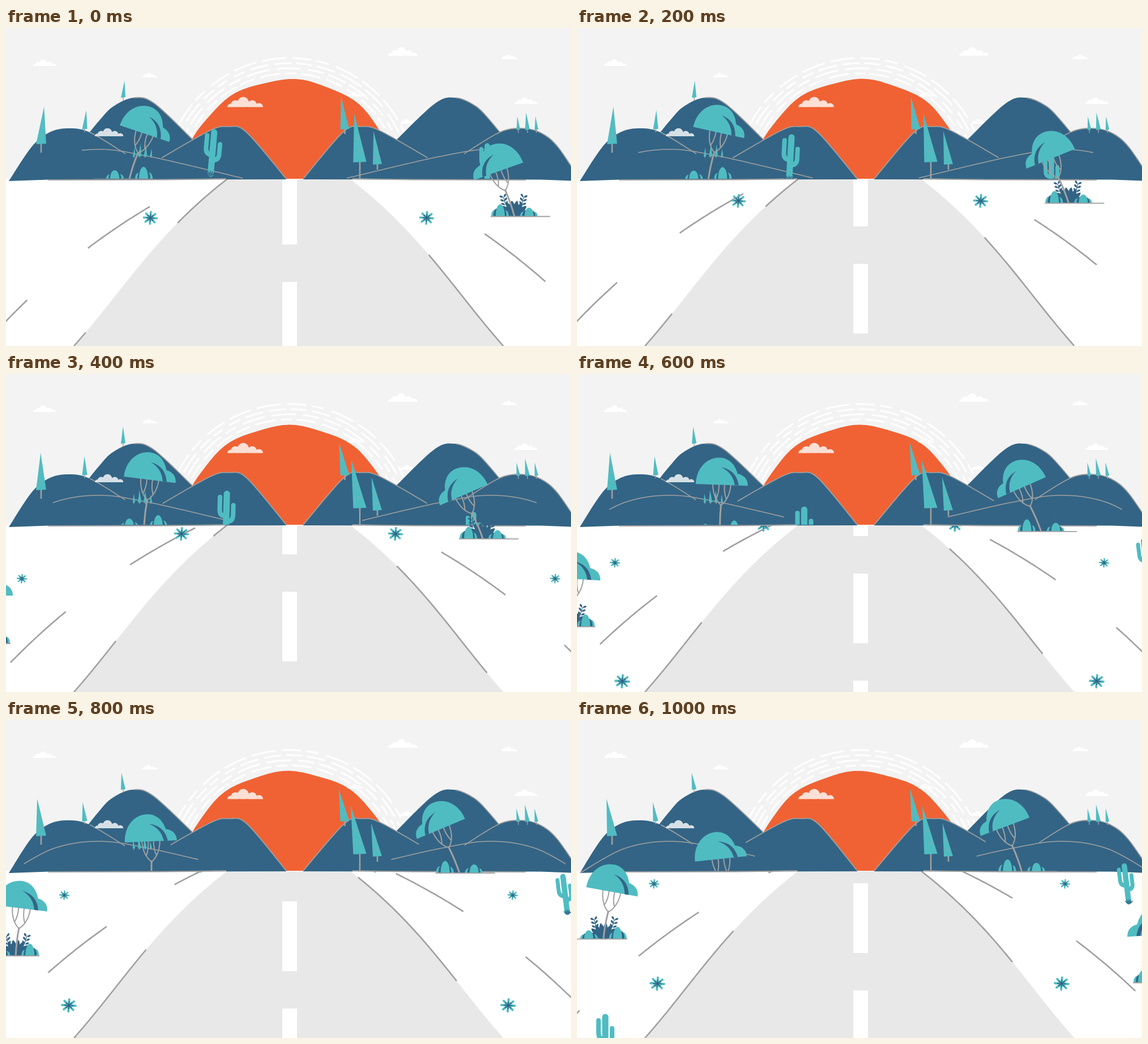
An HTML page with a canvas for the animation above (1.2 s loop, 998 px wide and 561 px high).

```html
<!DOCTYPE html>
<html lang="en">
<head>
<meta charset="utf-8">
<title>Road to the sunset</title>
<style>
html, body { margin: 0; width: 100%; height: 100%; overflow: hidden; background: #fff; }
canvas { display: block; }
</style>
</head>
<body>
<canvas id="stage" width="998" height="561"></canvas>
<script>
const W = 998, H = 561, HORIZON = 267, STEP = 200, STEPS = 6;
const BLUE = '#336485', TEAL = '#4fbcc2', GRAY = '#a0a0a0', SUN = '#f06233';
const g = document.getElementById('stage').getContext('2d');

// ---------- helpers ----------
const rad = d => d * Math.PI / 180;
const quad = (n, a, b, c) => a + b * n + c * n * n;

function random(seed) {
  return () => (seed = (seed * 16807) % 2147483647) / 2147483647;
}

function isolated(draw) { g.save(); draw(); g.restore(); }

function clipped(x, y, w, h, draw) {
  isolated(() => { g.beginPath(); g.rect(x, y, w, h); g.clip(); draw(); });
}

function fill(color, trace) { g.beginPath(); trace(); g.fillStyle = color; g.fill(); }

function stroke(color, width, trace) {
  g.beginPath(); trace();
  g.strokeStyle = color; g.lineWidth = width; g.stroke();
}

// Smooth curve through points
function spline(p) {
  g.moveTo(...p[0]);
  for (let i = 0; i < p.length - 1; i++) {
    const a = p[i - 1] || p[i], b = p[i], c = p[i + 1], d = p[i + 2] || c;
    g.bezierCurveTo(b[0] + (c[0] - a[0]) / 6, b[1] + (c[1] - a[1]) / 6,
      c[0] - (d[0] - b[0]) / 6, c[1] - (d[1] - b[1]) / 6, c[0], c[1]);
  }
}

// Line through at(u) for u running from a to b
function curve(at, a, b) {
  for (let i = 0; i <= 24; i++) g.lineTo(...at(a + (b - a) * i / 24));
}

// ---------- sky ----------
function cloud(x, base, w, alpha = 1) {
  isolated(() => {
    const s = w / 64;
    g.translate(x, base - 18 * s);
    g.scale(s, s);
    g.globalAlpha = alpha;
    g.beginPath(); g.rect(0, -1, 64, 19); g.clip();
    fill('#fff', () => {
      for (const [cx, cy, r] of [[6, 18, 6], [14, 14, 8], [28, 10, 10], [44, 14, 8], [56, 18, 7]]) {
        g.moveTo(cx + r, cy); g.arc(cx, cy, r, 0, 7);
      }
      g.rect(8, 12, 46, 6);
    });
  });
}

function rays(n) {
  const rnd = random(11);
  isolated(() => {
    g.translate(501, 275);
    g.rotate(rad(-1.2 * n));
    for (let r = 195; r <= 222; r += 9) {
      for (let a = 180 + 5 * rnd(); a < 360;) {
        const len = 5 + 7 * rnd();
        stroke('#fff', 3, () => g.arc(0, 0, r, rad(a), rad(a + len)));
        a += len + 2 + 2 * rnd();
      }
    }
  });
}

// Disc with a slight ripple that turns to the left
function sun(n) {
  const crest = rad(-90 + 4.5 - 2.4 * n + .2 * n * n);
  fill(SUN, () => {
    curve(u => {
      const a = rad(u), r = 184 + 1.5 * Math.cos(10 * (a - crest)) + 4 * Math.cos(a) ** 2;
      return [500 + r * Math.cos(a), 275 + r * Math.sin(a)];
    }, 180, 270);
    curve(u => {
      const a = rad(u), r = 184 + 1.5 * Math.cos(10 * (a - crest)) + 4 * Math.cos(a) ** 2;
      return [500 + r * Math.cos(a), 275 + r * Math.sin(a)];
    }, 270, 360);
  });
}

// ---------- road ----------
function leftEdge(y) {
  const s = (y - HORIZON) / (H - HORIZON);
  return [390 - 380.5 * s + 212 * s * s - 101.5 * s ** 3, y];
}

function rightEdge(y) { return [998.5 - leftEdge(y)[0], y]; }

const leftTrack = u => [quad(u, 8, 32.2, .5), quad(u, 509, -33, .71)];
const rightTrack = u => [1027 - leftTrack(u)[0], leftTrack(u)[1] + 1.4];

function road(n) {
  fill('#e8e8e8', () => { curve(leftEdge, HORIZON, H); curve(rightEdge, H, HORIZON); });
  clipped(0, HORIZON, W, H, () => {
    for (let y = 259 - 32 * n; y < H; y += 189) fill('#fff', () => g.rect(488, y, 26, 123));
  });

  const line = (at, from, to) => {
    if (from < to) stroke(GRAY, 2.6, () => curve(at, from, to));
  };
  line(leftEdge, HORIZON, 344 - 29 * n);
  line(leftEdge, 537 - 33 * n, H);
  line(rightEdge, Math.max(HORIZON, 400 - 30.6 * n), Math.min(H, 594 - 33.4 * n));

  const dash = (at, from, len) => line(at, Math.max(from, -2), Math.min(from + len, 9.2));
  for (let u = n - 8; u < 10; u += 6) {
    dash(leftTrack, u, 2.9);
    dash(rightTrack, u - 2, 3);
  }
}

// ---------- flowers ----------
function flower(x, y, r) {
  isolated(() => {
    g.translate(x, y);
    g.lineCap = 'round';
    for (const [color, len, w] of [[TEAL, .92, .29], [BLUE, .55, .13]]) {
      stroke(color, r * w, () => {
        for (let a = 4; a < 360; a += 45) {
          g.moveTo(0, 0); g.lineTo(r * len * Math.cos(rad(a)), r * len * .9 * Math.sin(rad(a)));
        }
      });
    }
  });
}

function flowers(n) {
  const pair = (x, y, r) => { flower(x, y, r); flower(W - x, y, r); };
  pair(quad(n, 255, 32.5, -2.5), quad(n, 335, -33.5, 3.5), 12.5);
  pair(quad(n - 2, 28, 40.5, -1.5), quad(n - 2, 361, -30, 2), 8.7);
  pair(80 + 31 * (n - 3), 542 - 38.5 * (n - 3), 13);
}

// ---------- hills ----------
const OUTER = [[5, 270], [45, 210], [75, 185], [108, 177], [148, 184], [211, 222]];
const BACK = [[130, 206], [165, 163], [190, 138], [226, 123], [262, 133], [330, 197]];
const MID = [[275, 229], [360, 181], [393, 174], [425, 184], [495, 266]];
const RIDGE = [[5, 270], [83, 227], [165, 214], [260, 228], [418, 265]];

function hills(n, flip) {
  isolated(() => {
    if (flip) { g.translate(1020, 0); g.scale(-1, 1); }
    const lean = (pts, k) => pts.map(([x, y]) => [x + (flip ? -k : k) * n * (268 - y) / 100, y]);
    const outer = lean(OUTER, -.55), back = lean(BACK, -.55), mid = lean(MID, .45);
    const line = (pts, x0, x1) =>
      clipped(x0, 0, x1 - x0, H, () => stroke(GRAY, 1.7, () => spline(pts)));
    const hill = (pts, x0, x1) =>
      fill(BLUE, () => { spline(pts); g.lineTo(x1, HORIZON); g.lineTo(x0, HORIZON + .5); });

    hill(back, 130, 330);
    flip ? line(back, 140, 226) : line(back, 226, 330);
    hill(outer, 75, 280);
    hill(mid, 200, 495);
    line(outer, flip ? 20 : 148, Math.min(211, 234 - 6 * n));
    line(mid, Math.max(275, 262 + 7.2 * n), 495);
    line(RIDGE, 134 - 25.6 * n, 442 - 25.6 * n);
  });
}

function horizon() {
  stroke(GRAY, 2, () => {
    spline([[74, 268], [280, 267.5], [389, 266]]);
    spline([[612, 266], [720, 267.5], [918, 268]]);
  });
}

// ---------- pines ----------
function pine(x, base, h, lean, foot = 5) {
  const w = h * .27, tip = x + h * lean, top = base - h;
  stroke(GRAY, h > 50 ? 2.6 : 1.4, () => { g.moveTo(x, base - 3); g.lineTo(x, base + foot); });
  fill(TEAL, () => { g.moveTo(tip, top); g.lineTo(x + w / 2, base - 1); g.lineTo(x - w / 2, base); });
  if (h < 50) return;
  stroke('#8fa8ad', 1.4, () => {
    for (const k of [.5, .75]) {
      const mid = tip + (x - tip) * k, y = top + h * k, r = w * k / 2;
      g.moveTo(mid - r * .2, y + 4); g.lineTo(mid + r * .85, y - 1);
    }
  });
}

function pines(n) {
  const left = .08 - .046 * n, right = quad(n, -.115, -.042, .006);
  pine(62, 205, 66, left, 15);
  pine(207, 123, 30, left);
  pine(139, 179, 34, left);
  for (let i = 0; i < 4; i++) pine(226 + 10 * i, 227, 15 + 8 * Math.sin(i + .2), left, 2);
  pine(598.5, 179, 58, right, 8);
  pine(656, 241, 59, right, 9);
  pine(625, 237, 86, right, 29);
  for (let i = 0; i < 3; i++) pine(905 + 16 * i, 180, 24 + 7 * (i % 2), right + .04);
}

// ---------- plants ----------
function dome(color, x, w, h) {
  fill(color, () => {
    g.moveTo(x - w, 0);
    g.bezierCurveTo(x - w, -h * 1.33, x + w, -h * 1.33, x + w, 0);
  });
}

function leaf(angle, len, w) {
  isolated(() => {
    g.rotate(rad(angle));
    fill(BLUE, () => {
      g.moveTo(0, 0);
      g.quadraticCurveTo(-w, -len * .7, 0, -len);
      g.quadraticCurveTo(w, -len * .7, 0, 0);
    });
  });
}

function fern(x, y) {
  stroke(BLUE, 1.2, () => { g.moveTo(0, 0); g.quadraticCurveTo(x * .8, y * .4, x, y); });
  for (let i = 0; i < 3; i++) {
    for (const side of [-50, 50]) {
      isolated(() => {
        g.translate(x * (1 - .08 * i), y * (1 - .2 * i));
        leaf(side + x, 8, 3.5);
      });
    }
  }
}

function bush(x, h) {
  dome(TEAL, x - 9, 6, h * .5);
  dome(BLUE, x - 5, 6, h * .65);
  dome(TEAL, x + 9, 7, h * .55);
  dome(BLUE, x + 6, 6, h * .65);
  dome(TEAL, x, 8, h);
}

function crown() {
  fill(TEAL, () => {
    g.moveTo(20, -84); g.lineTo(24, -105);
    g.bezierCurveTo(38, -104, 46, -96, 46, -84);
  });
  fill(TEAL, () => {
    g.moveTo(-46, -84);
    g.bezierCurveTo(-46, -112, -28, -132, -5, -132);
    g.bezierCurveTo(15, -132, 30, -114, 30, -84);
  });
  fill(BLUE, () => {
    g.moveTo(-2, -115);
    g.quadraticCurveTo(25, -111, 30, -84);
    g.lineTo(23, -84);
    g.quadraticCurveTo(19, -106, -2, -115);
  });
}

function tree(tilt) {
  for (let a = -70; a <= 70; a += 20) leaf(a, 28, 8);
  fern(-16, -33);
  fern(19, -33);
  isolated(() => {
    g.rotate(rad(tilt));
    stroke(GRAY, 3, () => { g.moveTo(0, 0); g.quadraticCurveTo(-2, -25, 0, -50); });
    stroke(GRAY, 2, () => {
      for (const s of [-1, 1]) {
        g.moveTo(0, -48); g.quadraticCurveTo(15 * s, -60, 16 * s, -86);
        g.moveTo(9 * s, -59); g.quadraticCurveTo(4 * s, -70, 5 * s, -86);
      }
    });
    crown();
  });
  bush(25, 21);
  bush(-26, 15);
  stroke(GRAY, 1.8, () => { g.moveTo(-63, .5); g.lineTo(42, .5); });
}

function cactus(tilt) {
  isolated(() => {
    g.rotate(rad(tilt));
    g.lineCap = g.lineJoin = 'round';
    stroke(TEAL, 11, () => { g.moveTo(0, -5); g.lineTo(0, -78); });
    stroke(TEAL, 8, () => {
      g.moveTo(0, -38); g.quadraticCurveTo(-12, -38, -12, -50); g.lineTo(-12, -72);
      g.moveTo(0, -29); g.quadraticCurveTo(12, -29, 12, -40); g.lineTo(12, -58);
    });
  });
  for (let a = -50; a <= 50; a += 25) leaf(a, 11, 2);
}

function plant(draw, x, y, tilt, sx = 1, sy = 1) {
  isolated(() => { g.translate(x, y); g.scale(sx, sy); draw(tilt); });
}

function plants(n) {
  // These sink behind the horizon
  clipped(0, 0, W, HORIZON - 1, () => {
    plant(cactus, 361 + 13.5 * n, quad(n, 262, 4, 4.8), 5 - 1.7 * n);
    plant(cactus, 850 - 12 * n, 276 + 20 * n, 0, .87, .87);
    plant(tree, quad(n, 218, 15.5, -1.3), 266 + .5 * n ** 3, quad(n, 18.5, -6.4, .3));
  });
  // These stand on the open ground
  const m = n - 2, k = n - 5;
  plant(cactus, 50 + 30 * k, 602 - 44 * k, 0);
  plant(cactus, 975 - 17 * k, 325 - 18.5 * k, -7, .87, .87);
  plant(tree, quad(m, -34, 23, 1.3), 475 - 29.7 * m, 3.4 * m);
  plant(tree, quad(n, 898, -31.5, 1.8), quad(n, 332, -26, 2.6), quad(n, 19.5, 3.2, -.6), -1);
  plant(tree, 1024 - 26 * k, 463 - 32 * k, 4, -1);
}

// ---------- scene ----------
function scene(n) {
  fill('#fff', () => g.rect(0, 0, W, H));
  fill('#f3f3f3', () => g.rect(0, 0, W, HORIZON));
  rays(n);
  cloud(696, 169, 29);
  sun(n);
  cloud(603, 121, 29, .8);
  fill('#fff', () => g.rect(0, HORIZON - 1, W, H));
  road(n);
  flowers(n);
  hills(n, false);
  hills(n, true);
  horizon();
  cloud(48, 67, 41);
  cloud(240, 87, 28);
  cloud(675, 49, 53);
  cloud(875, 55, 29);
  cloud(898, 134, 41);
  cloud(391, 139.5, 64, .8);
  cloud(157, 191, 51, .8);
  pines(n);
  plants(n);
}

function tick() {
  const t = performance.now() % (STEP * STEPS);
  scene(Math.floor(t / STEP));
  requestAnimationFrame(tick);
}
tick();
</script>
</body>
</html>
```
